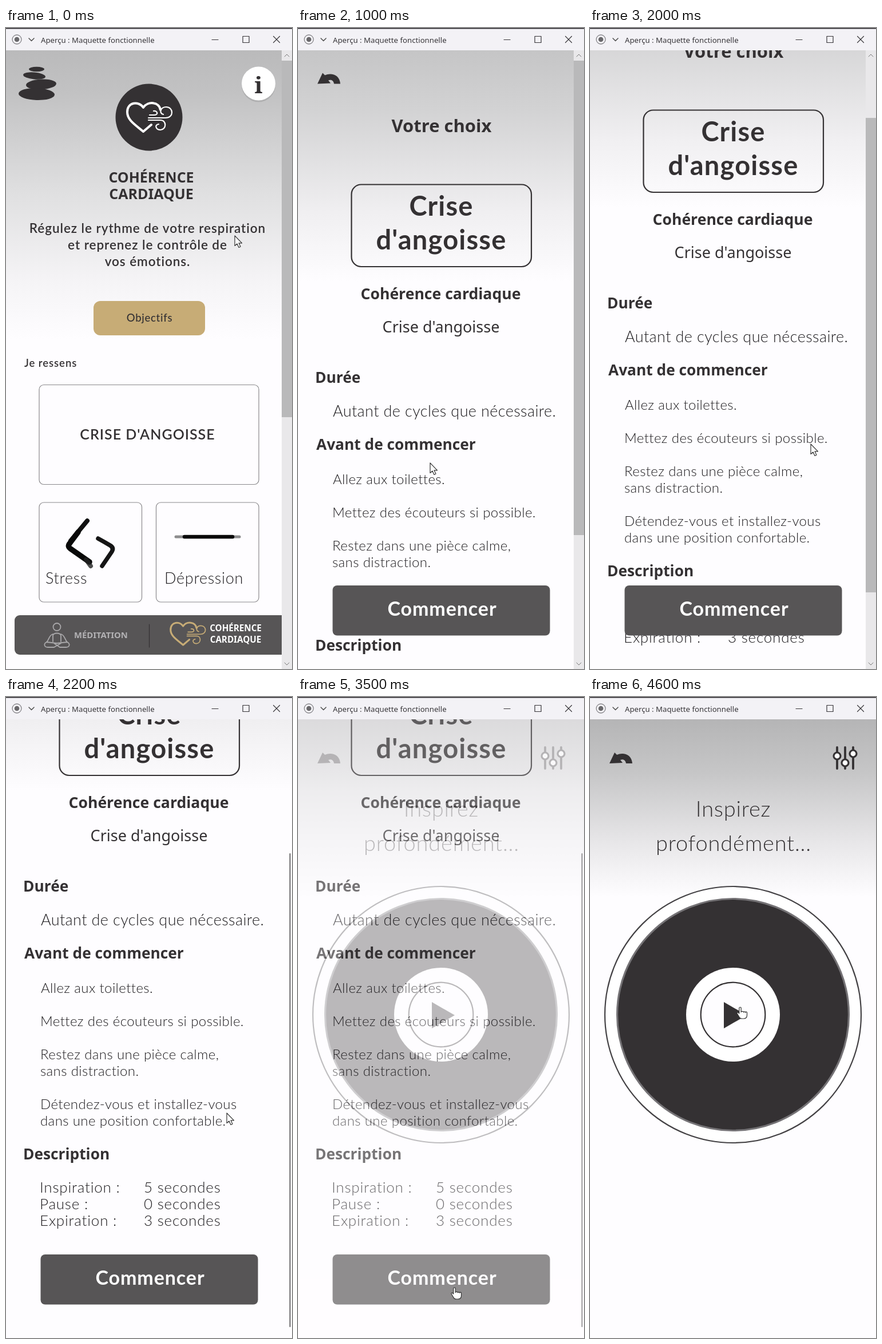
Write an HTML page that moves like this. It is 500 px wide and 1120 px high and loops after 5000 ms.

```html
<!DOCTYPE html>
<html lang="fr">
<head>
<meta charset="utf-8">
<title>Maquette fonctionnelle</title>
<style>
  html, body { margin: 0; width: 100%; height: 100%; overflow: hidden; background: #fefdff; }
  svg { display: block; width: 100vw; height: 100vh; }
  .q { font-family: Lato, sans-serif; }
  .e { font-family: "Noto Sans", "Open Sans", sans-serif; }
  .line { fill: none; stroke-linecap: round; stroke-linejoin: round; }
</style>
</head>
<body>
<svg id="stage" viewBox="0 0 500 1120"></svg>
<script>
const LOOP = 5000, STEP = 100;
const INK = '#343133', DEEP = '#1f1d20', PAPER = '#fefdff', SLATE = '#575556', GOLD = '#c7ac76';

// Markup helpers
const text = (font, size, weight, spacing, fill, anchor) => (str, x, y) =>
  `<text class="${font}" x="${x}" y="${y}" font-size="${size}" font-weight="${weight}" ` +
  `letter-spacing="${spacing}" fill="${fill}" text-anchor="${anchor}">${str}</text>`;
const rect = (x, y, w, h, r, fill, more = '') =>
  `<rect x="${x}" y="${y}" width="${w}" height="${h}" rx="${r}" fill="${fill}" ${more}/>`;
const circle = (x, y, r, fill, more = '') =>
  `<circle cx="${x}" cy="${y}" r="${r}" fill="${fill}" ${more}/>`;
const line = (d, stroke, width, more = '') =>
  `<path class="line" d="${d}" stroke="${stroke}" stroke-width="${width}" ${more}/>`;
const gradient = (id, y2, ...stops) =>
  `<linearGradient id="${id}" gradientUnits="userSpaceOnUse" x1="0" y1="39" x2="0" y2="${y2}">` +
  stops.map(([at, c]) => `<stop offset="${at}" stop-color="${c}"/>`).join('') + '</linearGradient>';
const page = (id, body) =>
  `<g id="${id}" clip-path="url(#view)">${rect(0, 39, 500, 1081, 0, PAPER)}${body}</g>`;

const scrollbar = (id, length) => `<g id="${id}">
  ${rect(482, 39, 18, 1081, 0, '#e9e8ea')}
  ${rect(482, 57, 18, length, 0, '#b9b9ba', `id="${id}Thumb"`)}
  ${line('M487 50l4-4l4 4M487 1109l4 4l4-4', '#777', 1)}</g>`;

const backArrow = dy => `<path transform="translate(0 ${dy})" fill="${INK}"
  d="M43 97L47 101C58 96 73 100 74 116H63C62 110 58 108 53 110L57 115L34 116Z"/>`;

const heart = (heartColor, windColor) =>
  line('M254 169L240 181C226 169 212 161 212 147C212 129 232 127 240 139C248 127 268 129 270 143', heartColor, 4) +
  line('M249 157H279C294 157 293 138 280 138C270 138 267 149 275 151M251 152H259C267 152 265 144 258 145' +
       'M249 161H270C281 161 281 177 270 178C262 178 259 169 267 168', windColor, 2.2);

const titleBar = `
  ${rect(0, 0, 500, 39, 0, '#f3f2f6')}${rect(0, 0, 500, 1.5, 0, '#29272b')}
  ${circle(19, 20, 8, 'none', 'stroke="#858488" stroke-width="1.3"')}${circle(19, 20, 4.3, '#69686b')}
  ${line('M40 18l4.5 4.5l4.5-4.5', '#555', 1.6)}
  ${text('e', 13.2, 400, 0, '#38363a', 'start')('Aperçu : Maquette fonctionnelle', 61, 25.5)}
  ${line('M360 20.5H371M414 14.5h11v11h-11zM467.5 14.5l11 11M478.5 14.5l-11 11', '#38363a', 1.2)}`;

function homePage() {
  const title = text('e', 25, 600, 0, INK, 'middle');
  const intro = text('q', 22.5, 600, .95, INK, 'middle');
  const label = text('q', 27, 300, .7, DEEP, 'start');
  const tab = text('e', 15.2, 700, 0, '#fff', 'middle');
  const stone = (x, y, rx, ry, a) =>
    `<ellipse cx="${x}" cy="${y}" rx="${rx}" ry="${ry}" fill="${INK}" transform="rotate(${a} ${x} ${y})"/>`;
  const card = (x, y, w) => rect(x, y, w, 174, 8, PAPER, 'stroke="#8a898c" stroke-width="1.2"');
  return page('home', `
    ${rect(0, 39, 500, 505, 0, 'url(#g1)')}
    ${stone(53.5, 72, 13.5, 4.2, 0)}${stone(49.5, 83.5, 19.5, 6, 5)}
    ${stone(61.5, 98.5, 26.5, 9, -3)}${stone(53.5, 115.5, 31.5, 10.5, 2)}
    ${circle(441.5, 100, 29.5, '#000', 'opacity=".1"')}${circle(441.5, 97, 29.5, '#fff')}
    <text x="441.5" y="114" font-family="Noto Serif, serif" font-size="40" font-weight="700"
      fill="${INK}" text-anchor="middle">i</text>
    ${circle(250, 156, 58.5, INK)}${heart('#fff', '#fff')}
    ${title('COHÉRENCE', 254, 270)}${title('CARDIAQUE', 254, 299)}
    ${intro('Régulez le rythme de votre respiration', 247.5, 358)}
    ${intro('et reprenez le contrôle de', 247.5, 387)}
    ${intro('vos émotions.', 247.5, 416)}
    ${rect(153, 477, 195, 60, 12, GOLD)}
    ${text('q', 18.5, 500, .7, INK, 'middle')('Objectifs', 251, 513)}
    ${text('q', 18.5, 600, .95, INK, 'start')('Je ressens', 32, 592)}
    ${card(58, 623.5, 384)}${card(58, 829, 179.5)}${card(262.5, 829, 179.5)}
    ${text('q', 25, 600, 1, INK, 'middle')("CRISE D'ANGOISSE", 247.5, 719)}
    ${line('M142 861L113 896', '#111', 8)}
    ${line('M126 881L111 901Q107 906 113 910L146 933', '#080808', 9.5)}
    ${line('M140 929L148 940', '#222', 8, 'opacity=".8"')}
    ${line('M161 892Q172 898 182 904Q189 908 185 915L168 940', '#151515', 7.5)}
    ${line('M297 889H408', '#444', 5, 'opacity=".6"')}${line('M312 889H396', '#080808', 6.5)}
    ${label('Stress', 69, 971)}${label('Dépression', 277, 971)}
    ${rect(15, 1026, 480, 69, 9, SLATE)}
    ${line('M250.5 1042V1082', '#333133', 1.2)}
    ${circle(89, 1046.5, 6.5, 'none', 'stroke="#a9a8aa" stroke-width="1.8"')}
    ${line('M82 1072V1062C82 1056 96 1056 96 1062V1072M82 1059C75 1061 76 1068 71 1073' +
      'M96 1059C103 1061 102 1068 107 1073M89 1075L71 1073C65 1076 67 1082 73 1082H84L96 1075' +
      'M89 1075L107 1073C113 1076 111 1082 105 1082H94L84 1075', '#a9a8aa', 1.8)}
    ${text('e', 14.8, 600, 0, '#b3b2b4', 'middle')('MÉDITATION', 166, 1066)}
    <g transform="translate(122.4 936.8) scale(.78)">${heart(GOLD, GOLD)}</g>
    ${tab('COHÉRENCE', 401.5, 1054)}${tab('CARDIAQUE', 401.5, 1074)}
    ${scrollbar('bar1', 623)}`);
}

function choicePage() {
  const head = text('e', 26.3, 600, 0, INK, 'start');
  const name = text('q', 47, 700, 1.2, INK, 'middle');
  const body = text('q', 24, 300, .4, DEEP, 'start');
  const fact = text('q', 26, 300, .8, DEEP, 'start');
  const facts = [['Inspiration :', 5], ['Pause :', 0], ['Expiration :', 3]];
  return page('choice', `
    <g id="sheet">
      ${rect(0, 39, 500, 405, 0, 'url(#g2)')}
      ${backArrow(-18.5)}
      ${text('e', 31, 600, 0, INK, 'middle')('Votre choix', 251, 182)}
      ${rect(93.5, 273.5, 314.5, 143.5, 17, 'none', `stroke="${INK}" stroke-width="2.2"`)}
      ${name('Crise', 250.5, 327.5)}${name("d'angoisse", 250.5, 386.5)}
      ${text('e', 26.6, 600, 0, INK, 'middle')('Cohérence cardiaque', 249.5, 474)}
      ${text('e', 27, 400, 0, INK, 'middle')("Crise d'angoisse", 250, 532)}
      ${head('Durée', 30, 620)}
      ${text('q', 27, 300, .4, DEEP, 'start')('Autant de cycles que nécessaire.', 61, 679)}
      ${head('Avant de commencer', 32, 737)}
      ${body('Allez aux toilettes.', 61, 797)}
      ${body('Mettez des écouteurs si possible.', 60, 855)}
      ${body('Restez dans une pièce calme,', 60, 913)}
      ${body('sans distraction.', 60, 942)}
      ${body('Détendez-vous et installez-vous', 60, 1000)}
      ${body('dans une position confortable.', 60, 1029)}
      ${head('Description', 30, 1088)}
      ${facts.map(([k, n], i) => fact(k, 59, 1146 + 29 * i) + fact(n + ' secondes', 241, 1146 + 29 * i)).join('')}
    </g>
    ${rect(60.5, 974, 380, 87.5, 8, SLATE)}
    ${text('q', 34, 700, .9, '#fff', 'middle')('Commencer', 252, 1026.5)}
    ${scrollbar('bar2', 829)}
    ${rect(495.5, 273, 2, 828, 1, '#69686b', 'id="thinBar"')}`);
}

function breathPage() {
  const cue = text('q', 38, 300, .8, INK, 'middle');
  const slider = (x, y) => line(`M${x} 88V125`, INK, 3.8) +
    circle(x, y, 6, '#fff', `stroke="${INK}" stroke-width="3.2"`);
  return page('breath', `
    ${rect(0, 39, 500, 310, 0, 'url(#g3)')}
    ${backArrow(0)}
    ${slider(432, 103)}${slider(446, 115)}${slider(460, 99)}
    ${cue('Inspirez', 250.5, 209)}${cue('profondément...', 251, 269)}
    ${circle(250, 555, 224, '#fff', 'stroke="#444245" stroke-width="2.2"')}
    ${circle(250, 555, 202.5, INK, 'stroke="#757376" stroke-width="3.2"')}
    ${circle(250, 555, 82, '#fff')}
    ${circle(250, 555, 56.3, PAPER, `stroke="${INK}" stroke-width="2.2"`)}
    <path d="M234 533L274 556L234 579Z" fill="${INK}"/>`);
}

const $ = id => document.getElementById(id);
$('stage').innerHTML = `
  <defs>
    <clipPath id="view">${rect(0, 39, 500, 1081, 0, '#000')}</clipPath>
    ${gradient('g1', 544, [0, '#bababb'], [.15, '#c2c2c3'], [.5, '#e0e0e1'], [.8, '#f5f4f6'], [1, PAPER])}
    ${gradient('g2', 444, [0, '#c5c5c6'], [.25, '#d2d2d3'], [.7, '#f0eff1'], [1, PAPER])}
    ${gradient('g3', 349, [0, '#b5b5b6'], [.3, '#c6c6c7'], [.7, '#e8e7e9'], [1, PAPER])}
  </defs>
  ${homePage()}${choicePage()}${breathPage()}${titleBar}
  <g id="cursor" fill="#fff" stroke="#333" stroke-width="1.2" stroke-linejoin="round">
    <path id="arrow" d="M0 0V17.5L4 14L7 20.5L10 19L7 12.8H12.5Z"/>
    <path id="hand" d="M0-1C-1-1-1.7-.3-1.7.7V10l-1.5-1.5c-1-1-2.7-.2-2.2 1.2L-2 15.5c1 2.5 3 3.5 5.5 3.5H6
      c3.5 0 6-2 6-6V8.7c0-2-2.6-2-2.8-.4c0-1.8-2.7-2-3-.4c0-1.7-4.3-2-4.5-.4V.7C1.7-.3 1-1 0-1z"/>
  </g>`;

// Keys are [time, ...values], eased between neighbours
const pointer = [
  [0, 400, 363], [400, 231, 760], [1200, 231, 760], [1700, 340, 742], [1800, 386, 727],
  [2300, 386, 727], [2900, 273.5, 1033], [3500, 273.5, 1033], [3600, 263, 1028],
  [3800, 263, 1028], [4500, 262.5, 543]
];
const scroll = [[1800, 0], [1900, 21], [2000, 130], [2100, 235], [2200, 280]];

const clamp = v => Math.max(0, Math.min(1, v));
function sample(keys, t) {
  const i = keys.findIndex(k => k[0] > t);
  if (i < 0) return keys[keys.length - 1].slice(1);
  if (i === 0) return keys[0].slice(1);
  const a = keys[i - 1], b = keys[i];
  const p = (t - a[0]) / (b[0] - a[0]), s = p * p * (3 - 2 * p);
  return a.slice(1).map((v, n) => v + (b[n + 1] - v) * s);
}
const show = (id, on) => $(id).setAttribute('display', on ? 'inline' : 'none');
const fade = (id, v) => { $(id).setAttribute('opacity', v); show(id, v > 0); };
const move = (id, x, y) => $(id).setAttribute('transform', `translate(${x} ${y})`);

function draw(t) {
  fade('choice', clamp((t - 500) / 300));
  fade('breath', clamp((t - 3400) / 300));

  const [y] = sample(scroll, t);
  move('sheet', 0, -y);
  move('bar2Thumb', 0, y * .77);
  show('bar2', t < 2100);
  show('thinBar', t >= 2100);

  const [cx, cy] = sample(pointer, t);
  const onLink = (t >= 300 && t <= 600) || (t >= 2800 && t <= 3500) || t >= 4400;
  move('cursor', cx, cy);
  show('hand', onLink);
  show('arrow', !onLink);
}

const start = performance.now();
function tick() {
  const t = (performance.now() - start) % LOOP;
  draw(Math.floor(t / STEP) * STEP);
  requestAnimationFrame(tick);
}
tick();
</script>
</body>
</html>
```
